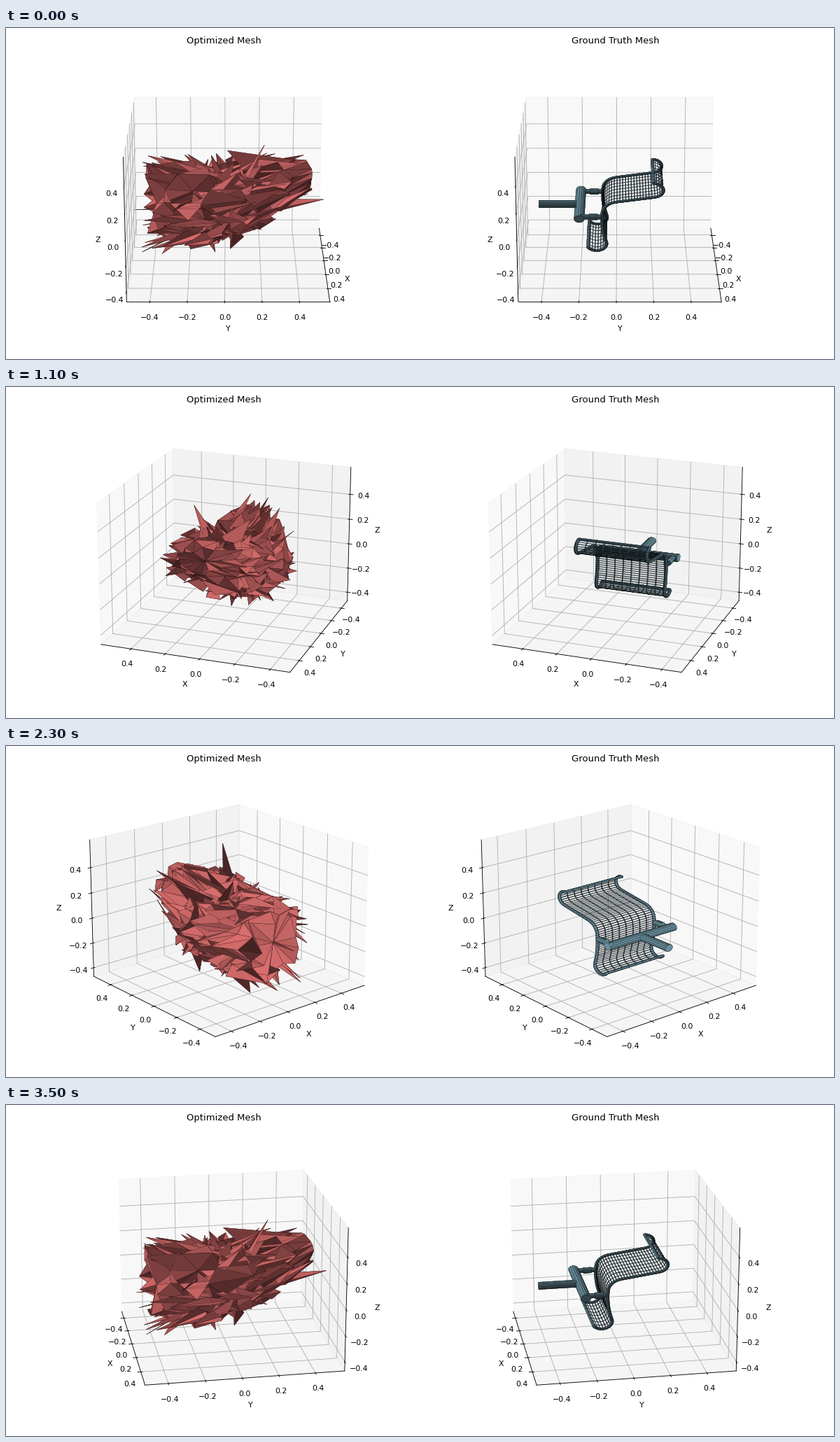
Recreate the animation shown at these times as a matplotlib script. Size 1183 by 473 pixels, loop 3.6 s.

```python
import numpy as np
import matplotlib.pyplot as plt
from matplotlib.animation import FuncAnimation
from mpl_toolkits.mplot3d.art3d import Poly3DCollection

WIDTH, HEIGHT = 1183, 473
DPI = WIDTH / 15
FRAMES = 36
RED = (0.85, 0.43, 0.43)
TEAL = (0.46, 0.62, 0.68)
SPAN = 1.087
CENTER = (0.035, 0.0185, 0.0725)


def body_point(y, angle, scale):
    """Point on the blob: a round section that narrows and rises along +y."""
    rise = np.clip(y, 0, None)
    half_x = 0.34 * (1 - 2 * y**2)
    x = 0.02 + half_x * np.cos(angle) * scale
    z = 0.475 * rise + (0.34 - 0.475 * rise) * np.sin(angle) * scale
    return np.stack([x, y, z], axis=-1)


def spike(tip, anchor, radius, rng):
    """Three-sided needle from a random base around the anchor to the tip."""
    base = anchor + rng.normal(0, radius, (3, 3))
    return [(tip, base[k], base[(k + 1) % 3]) for k in range(3)]


def spiky_blob():
    rng = np.random.default_rng(11)
    rings, sides = 11, 16
    y, angle = np.meshgrid(np.linspace(-0.40, 0.44, rings),
                           np.linspace(0, 2 * np.pi, sides, endpoint=False),
                           indexing="ij")
    y = np.clip(y + rng.normal(0, 0.08, y.shape), -0.46, 0.48)
    grid = body_point(y, angle, rng.uniform(0.5, 0.95, y.shape))
    front, back = grid[0].mean(axis=0), grid[-1].mean(axis=0)
    faces = []
    for j in range(sides):
        k = (j + 1) % sides
        for i in range(rings - 1):
            a, b, c, d = grid[i, j], grid[i + 1, j], grid[i + 1, k], grid[i, k]
            faces += [(a, b, c), (a, c, d)]
        faces += [(front, grid[0, j], grid[0, k]), (back, grid[-1, k], grid[-1, j])]

    # Long shards, mostly stretched along y.
    for _ in range(130):
        tip_y, turn = rng.uniform(-0.47, 0.47), rng.uniform(0, 2 * np.pi)
        base_y = tip_y * 0.4 + rng.normal(0, 0.06)
        faces += spike(body_point(tip_y, turn, rng.uniform(0.85, 1.12)),
                       body_point(base_y, turn, 0.65), 0.05, rng)

    # The few spikes that shape the outline.
    for tip in [(0.16, 0.216, 0.52), (0.20, 0.54, 0.12), (0.41, -0.22, 0.0),
                (0.15, -0.46, -0.32), (-0.17, -0.41, -0.31), (0.06, -0.50, -0.03)]:
        faces += spike(np.array(tip), np.multiply(tip, (0.9, 0.5, 0.45)), 0.035, rng)
    return faces


def tube(path, radius, sides=14, ref=(1, 0, 0)):
    path = np.asarray(path, float)
    tangent = np.gradient(path, axis=0)
    tangent /= np.linalg.norm(tangent, axis=1, keepdims=True)
    u = np.cross(tangent, ref)
    u /= np.linalg.norm(u, axis=1, keepdims=True)
    v = np.cross(tangent, u)
    angle = np.linspace(0, 2 * np.pi, sides, endpoint=False)[:, None, None]
    rings = (path + radius * (np.cos(angle) * u + np.sin(angle) * v)).swapaxes(0, 1)
    faces = [(rings[i, j], rings[i, (j + 1) % sides],
              rings[i + 1, (j + 1) % sides], rings[i + 1, j])
             for i in range(len(path) - 1) for j in range(sides)]
    return faces + [rings[0][::-1], rings[-1]]


def seat_profile(count):
    """Side outline (y, z) traced through bends, and its unit tangents."""
    bends = [(0.16, -170), (0.22, 0), (0.115, 75), (0.235, 20), (0.16, -165)]
    lengths, turns = np.transpose(bends)
    stops = np.r_[0, np.cumsum(lengths)]
    at = np.linspace(0, stops[-1], count)
    heading = np.radians(np.interp(at, stops, np.r_[0, np.cumsum(turns)]))
    tangent = np.column_stack([np.cos(heading), np.sin(heading)])
    steps = (tangent[:-1] + tangent[1:]) / 2 * at[1]
    return np.vstack([[0, 0], np.cumsum(steps, axis=0)]) + (0.203, 0.246), tangent


def chair():
    half, z0 = 0.205, -0.014
    profile, tangent = seat_profile(56)
    ribs = np.linspace(-0.198, 0.198, 9)

    def patch(x0, x1, p, q):
        return [(x0, *p), (x1, *p), (x1, *q), (x0, *q)]

    faces = []
    for p, t in zip(profile, tangent):
        faces += [patch(a, b, p - 0.0025 * t, p + 0.0025 * t)
                  for a, b in zip(ribs[:-1], ribs[1:])]
    for x in ribs:
        faces += [patch(x - 0.003, x + 0.003, p, q)
                  for p, q in zip(profile[:-1], profile[1:])]

    for x in (-half, half):
        faces += tube([(x, *p) for p in profile], 0.009, sides=6)
        faces += tube([(x, -0.195, z0), (x, -0.085, z0)], 0.016, sides=10)
        faces += tube([(x, -0.150, z0), (x, -0.105, z0)], 0.021, sides=10)
    for p in (profile[0], profile[-1]):
        faces += tube([(x, *p) for x in np.linspace(-half, half, 9)],
                      0.008, sides=6, ref=(0, 0, 1))
    faces += tube([(-0.238, -0.204, z0), (0.238, -0.204, z0)], 0.028, ref=(0, 0, 1))
    faces += tube([(0, -0.434, z0), (0, -0.225, z0)], 0.026)
    return faces


def mesh_axes(center_x, title, faces, color, edge):
    size, bottom = 432.8, 11.8
    ax = fig.add_axes([(center_x - size / 2) / WIDTH, bottom / HEIGHT,
                       size / WIDTH, size / HEIGHT], projection="3d")
    ax.add_collection3d(Poly3DCollection(
        [np.asarray(face) for face in faces], facecolors=[color] * len(faces),
        edgecolors=[edge] * len(faces), linewidths=0.22, shade=True))
    for name, middle in zip("xyz", CENTER):
        ax.set(**{f"{name}lim": (middle - SPAN / 2, middle + SPAN / 2),
                  f"{name}ticks": np.linspace(-0.4, 0.4, 5),
                  f"{name}label": name.upper()})
    ax.set_title(title)
    return ax


# The small surplus keeps the pixel size from rounding down.
fig = plt.figure(figsize=((WIDTH + 0.01) / DPI, (HEIGHT + 0.01) / DPI), dpi=DPI)
axes = [
    mesh_axes(311.6, "Optimized Mesh", spiky_blob(), RED, (0.2, 0.08, 0.08)),
    mesh_axes(871.1, "Ground Truth Mesh", chair(), TEAL, (0, 0, 0)),
]


def update(frame):
    for ax in axes:
        ax.view_init(elev=20, azim=frame * 360 / FRAMES)
    return []


anim = FuncAnimation(fig, update, frames=FRAMES, interval=100,
                     init_func=lambda: [], repeat=True, repeat_delay=0)
plt.show()
```
